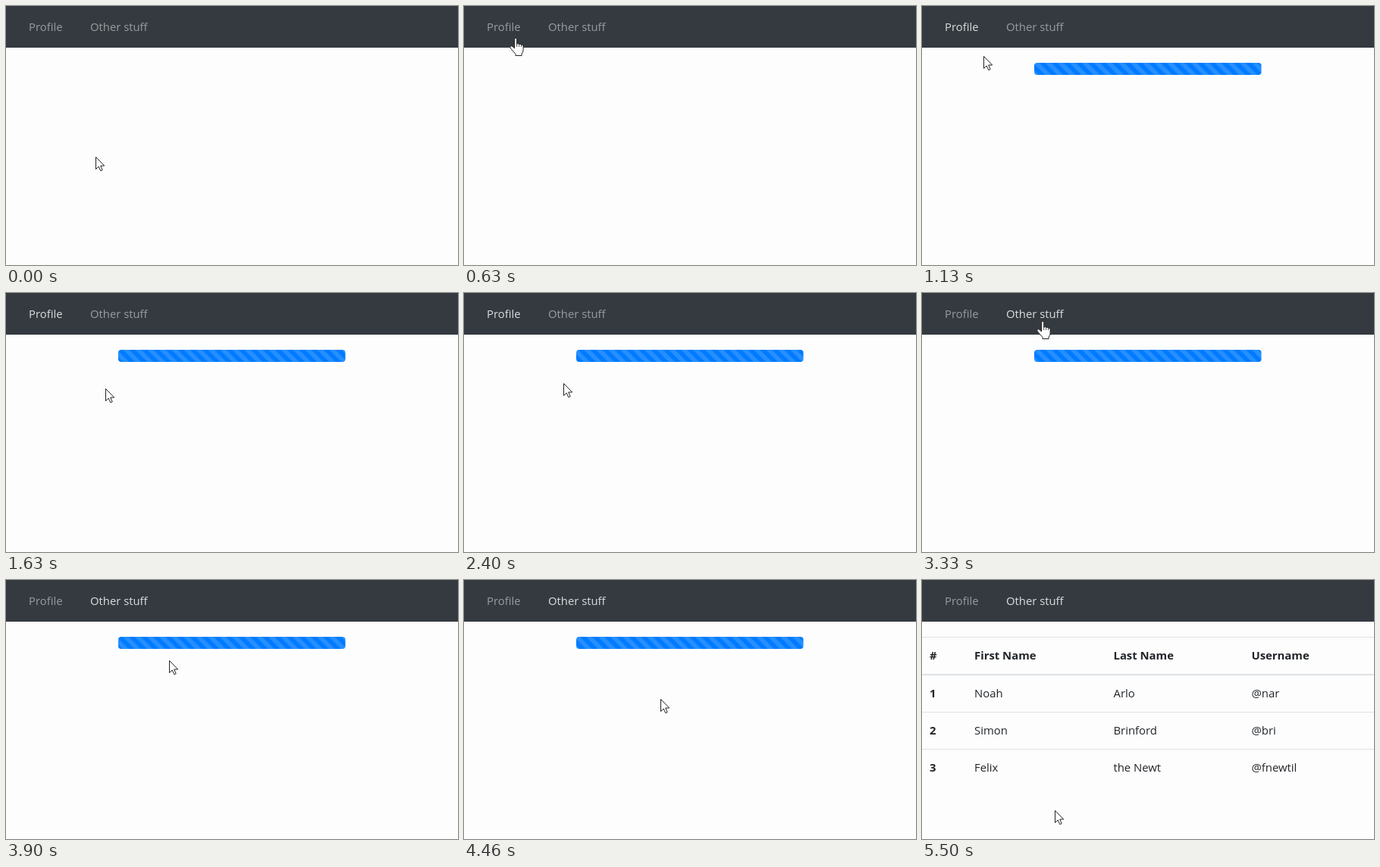
Animation of 596 by 342 pixels, one loop 5.54 s. Source, as an HTML page:

```html
<!DOCTYPE html>
<html lang="en">
<head>
<meta charset="utf-8">
<title>Tabs with loading bar</title>
<style>
  html, body { margin: 0; width: 100%; height: 100%; overflow: hidden; background: #fdfdfd; }
  svg { display: block; width: 596px; height: 342px; font: 14.85px "Open Sans", "Noto Sans", sans-serif; }
  .head { font-weight: 700; }
</style>
</head>
<body>
<svg viewBox="0 0 596 342">
  <defs>
    <pattern id="stripes" width="16" height="16" patternUnits="userSpaceOnUse">
      <rect width="16" height="16" fill="#007bff"/>
      <path d="M0 8V16H8ZM0 0H8L16 8V16Z" fill="#fff" fill-opacity=".15"/>
    </pattern>
    <linearGradient id="photoTone" x2="0" y2="1">
      <stop offset="0" stop-color="#dcdddd"/>
      <stop offset="1" stop-color="#b8babb"/>
    </linearGradient>
  </defs>
  <rect width="596" height="342" fill="#fdfdfd"/>
  <rect width="596" height="55" fill="#343a40"/>
  <text id="profileLink" x="30" y="33">Profile</text>
  <text id="otherLink" x="111" y="33">Other stuff</text>

  <rect id="photo" y="75" width="298" height="267" fill="url(#photoTone)"/>
  <rect id="bar" x="148" y="75" width="299.5" height="16" rx="4" fill="url(#stripes)"/>
  <g id="table" fill="#212529"></g>

  <g id="cursor" fill="#fff" stroke="#222" stroke-linejoin="round">
    <path id="arrow" d="M.5 .5V16.5L4.2 13L6.8 18.7L9.2 17.6L6.7 12H11.7Z"/>
    <g id="hand">
      <path d="M-1.5 13V.9a1.6 1.6 0 0 1 3.2 0V7.2q1.6-1.4 3 .4 1.6-1 2.8.6 2.6-.6 2.6 2V15q0 3-2 5v2.5H0v-2L-6.5 13q-1.6-3 1-3.2Q-3.5 10-1.5 13Z"/>
      <path d="M1.7 7V11M4.7 7.6V11M7.5 8.2V11" fill="none" stroke-width=".8"/>
    </g>
  </g>
</svg>
<script>
const LOOP = 5540;
const $ = id => document.getElementById(id);

const columns = [10, 69, 252.5, 434.5];
const rows = [
  { y: 105, cells: ["#", "First Name", "Last Name", "Username"] },
  { y: 155, cells: ["1", "Noah", "Arlo", "@nar"] },
  { y: 204, cells: ["2", "Simon", "Brinford", "@bri"] },
  { y: 253, cells: ["3", "Felix", "the Newt", "@fnewtil"] }
];
const line = (y, h) => `<rect y="${y}" width="596" height="${h}" fill="#dee2e6"/>`;
const cell = (text, col, row) =>
  `<text x="${columns[col]}" y="${rows[row].y}"${row && col ? "" : ' class="head"'}>${text}</text>`;
$("table").innerHTML =
  line(75, 1) + line(124, 2) + line(174, 1) + line(223, 1) +
  rows.map((r, i) => r.cells.map((text, c) => cell(text, c, i)).join("")).join("");

// Pointer path: time, x, y
const path = [
  [0, 118, 199], [129, 118, 199], [130, 118, 195], [300, 118, 195],
  [630, 68, 43], [830, 47, 25], [930, 47, 25],
  [1430, 131, 126], [2130, 131, 126], [2400, 131, 119],
  [2630, 146, 40], [2900, 152, 25], [3260, 155, 25], [3330, 159, 38],
  [3800, 205, 95], [4360, 259, 157], [4960, 259, 157], [5500, 175, 304], [LOOP, 175, 304]
];
// Loading periods: start, end
const loads = [[1030, 2470], [3260, 4700]];

function pointerAt(t) {
  const i = path.findIndex(p => p[0] > t);
  const [t0, x0, y0] = path[i - 1], [t1, x1, y1] = path[i];
  const k = (t - t0) / (t1 - t0);
  return [Math.round(x0 + (x1 - x0) * k), Math.round(y0 + (y1 - y0) * k)];
}

const within = (v, a, b) => v >= a && v < b;
const show = (id, on) => $(id).setAttribute("visibility", on ? "visible" : "hidden");
const setLink = (id, on) => $(id).setAttribute("fill", on ? "#dcddde" : "#999c9f");

function draw(t) {
  const [x, y] = pointerAt(t);
  const overLink = y < 47 && (within(x, 22, 84) || within(x, 103, 196));
  $("cursor").setAttribute("transform", `translate(${x} ${y})`);
  show("arrow", !overLink);
  show("hand", overLink);

  setLink("profileLink", within(t, 660, 3230));
  setLink("otherLink", t >= 2620);

  const load = loads.find(([a, b]) => within(t, a, b));
  show("bar", load);
  show("photo", within(t, loads[0][1], loads[1][0]));
  show("table", t >= loads[1][1]);
  if (load) {
    const shift = 148 + 16 * (1 - (t - load[0]) / 1000 % 1);
    $("stripes").setAttribute("patternTransform", `translate(${shift} 75)`);
  }
}

const start = performance.now();
function tick() {
  draw((performance.now() - start) % LOOP);
  requestAnimationFrame(tick);
}
tick();
</script>
</body>
</html>
```
